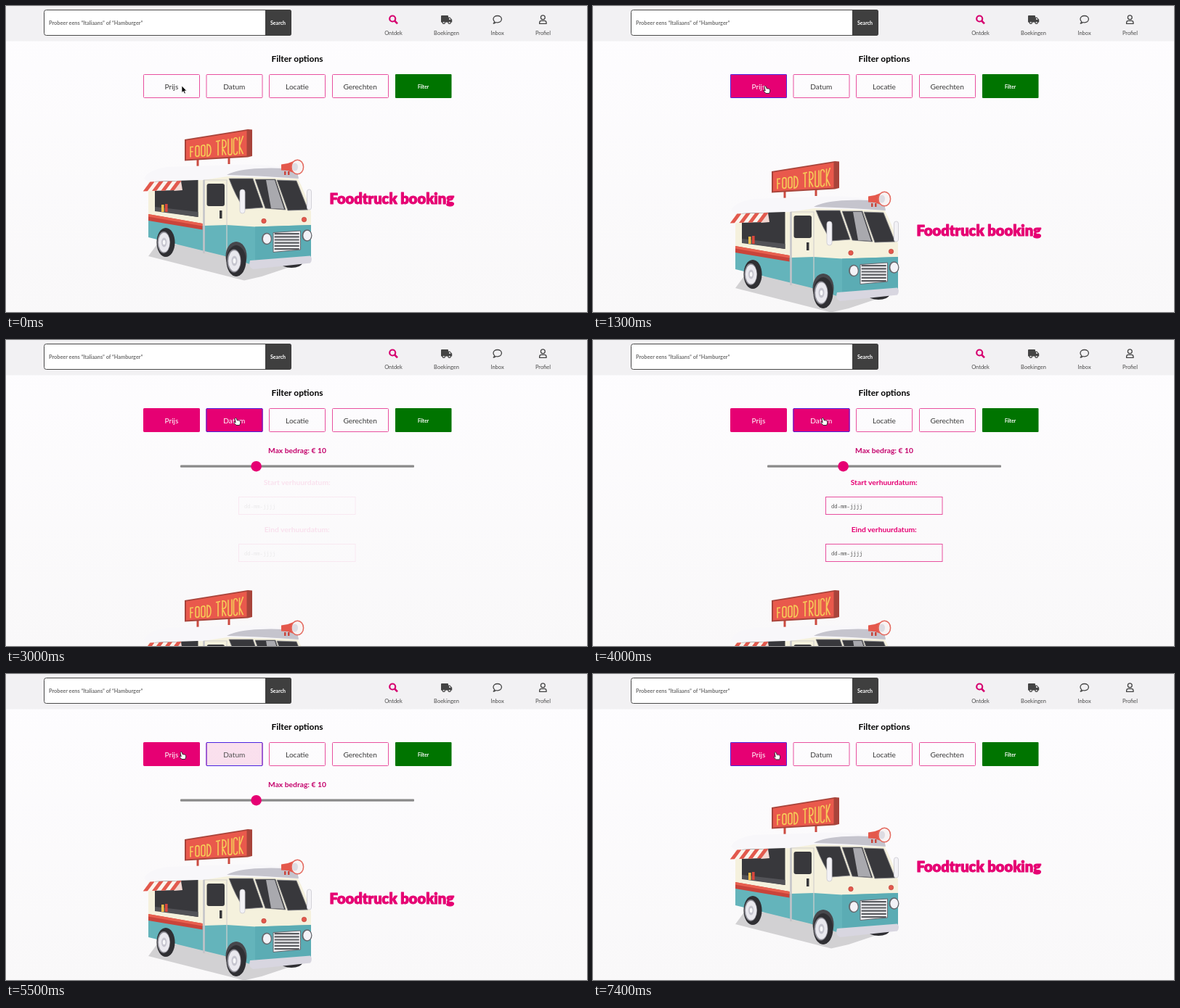
Write an HTML page that moves like this. It is 800x422 px and loops after 7500 ms.

```html
<!DOCTYPE html>
<html lang="nl">
<head>
<meta charset="utf-8">
<title>Filter options</title>
<style>
  html, body { margin: 0; width: 100%; height: 100%; overflow: hidden; background: #fbfafc; }
  svg { display: block; }
  text { font: 10.1px Lato, "Open Sans", sans-serif; fill: #3a3a3a; text-anchor: middle; }
  .bold { font-weight: 700; }
  .nav text { font-size: 7.5px; fill: #4a4a4a; }
  .start { text-anchor: start; }
  .label { font-size: 10.3px; font-weight: 700; fill: #c4006b; }
  .date { font: 7.2px "Noto Sans Mono", monospace; fill: #555; text-anchor: start; }
  .box { fill: none; stroke: #e8509f; }
  .on { fill: #e60073; stroke: #e60073; }
  .focus { fill: none; stroke: #4a22e0; }
  .white { fill: #fff; }
  .glass { fill: #38383c; }
  .brand { font-size: 20.1px; font-weight: 900; fill: #e60073; stroke: #e60073; stroke-width: 1px; stroke-linejoin: round; }

  /* One loop is 7.5 s: price opens at 1.3 s, dates at 2.9 s, they close at 4.9 s and 5.7 s. */
  .anim { animation: 7.5s linear infinite; }
  .step { animation-timing-function: step-end; }
  #hero { animation-name: hero; }
  #price { animation-name: price; }
  #dates { animation-name: dates; }
  #prijsOn { animation-name: prijsOn; }
  #datumOn { animation-name: datumOn; }
  #prijsFocus { animation-name: prijsFocus; }
  #datumFocus { animation-name: datumFocus; }
  #cursor { animation-name: cursor; }
  #arrow { animation-name: arrow; }
  #hand { animation-name: hand; }

  @keyframes hero {
    0% { transform: none; }
    17.33% { transform: translateY(44px); }
    38.66% { transform: translateY(175px); }
    65.33% { transform: translateY(44px); }
    75.99%, 100% { transform: none; }
  }
  @keyframes price {
    0%, 17.33% { opacity: 0; }
    30.66%, 75.98% { opacity: 1; }
    75.99%, 100% { opacity: 0; }
  }
  @keyframes dates {
    0%, 38.66% { opacity: 0; }
    52%, 65.32% { opacity: 1; }
    65.33%, 100% { opacity: 0; }
  }
  @keyframes prijsOn {
    0%, 5.33% { opacity: 0; }
    12%, 100% { opacity: 1; }
  }
  @keyframes datumOn {
    0%, 24.67% { opacity: 0; }
    31.33%, 68% { opacity: 1; }
    74%, 100% { opacity: 0; }
  }
  @keyframes prijsFocus {
    0% { opacity: 0; }
    17.33% { opacity: 1; }
    38.66% { opacity: 0; }
    75.99%, 100% { opacity: 1; }
  }
  @keyframes datumFocus {
    0% { opacity: 0; }
    38.66% { opacity: 1; }
    75.99%, 100% { opacity: 0; }
  }
  @keyframes cursor {
    0% { transform: translate(242px, 110px); }
    5.33%, 18% { transform: translate(239px, 110px); animation-timing-function: ease-in-out; }
    28% { transform: translate(314px, 107.5px); }
    33%, 66% { transform: translate(318px, 107px); animation-timing-function: ease-in-out; }
    73.33%, 85% { transform: translate(243px, 107px); }
    94%, 100% { transform: translate(253px, 107.5px); }
  }
  @keyframes arrow {
    0% { opacity: 1; }
    5.33%, 100% { opacity: 0; }
  }
  @keyframes hand {
    0% { opacity: 0; }
    5.33%, 100% { opacity: 1; }
  }
</style>
</head>
<body>
<svg width="800" height="422" viewBox="0 0 800 422">
  <defs>
    <linearGradient id="page" x2="0" y2="1">
      <stop stop-color="#fefdff"/><stop offset="1" stop-color="#f9f8f9"/>
    </linearGradient>
    <rect id="button" y="94.5" width="77" height="32" rx="1"/>
    <g id="wheel">
      <ellipse rx="13.5" ry="21.5" fill="#2f2f33"/>
      <ellipse cx="-3" rx="9.5" ry="16" fill="#8d8c95"/>
      <ellipse cx="-2.5" rx="8.3" ry="14.3" fill="#e9e8ee"/>
      <ellipse cx="-2.5" rx="4" ry="7" fill="#c6c5cf"/>
      <ellipse cx="-2.5" rx="2" ry="3.5" fill="#f8f8fa"/>
    </g>
    <g id="lamp">
      <ellipse rx="7" ry="8.2" fill="#66676d"/>
      <ellipse cx=".3" rx="5.4" ry="6.8" fill="#f3f2f7"/>
    </g>
  </defs>

  <rect width="800" height="422" fill="url(#page)"/>

  <!-- header -->
  <rect width="800" height="48.5" fill="#f2f1f3"/>
  <rect x="52.5" y="5.500" width="340" height="35" rx="3" fill="#fff" stroke="#4a4a4a"/>
  <path d="M357 5H390a3 3 0 0 1 3 3V38a3 3 0 0 1-3 3H357Z" fill="#3f3f3f"/>
  <text class="bold start" x="59" y="25.700" style="font-size:7.3px;fill:#707070">Probeer eens “Italiaans” of “Hamburger”</text>
  <text class="bold white" x="374.5" y="26" style="font-size:7.1px">Search</text>
  <g class="nav">
    <g fill="none" stroke="#d6006f" stroke-width="2.2">
      <circle cx="532.2" cy="17.5" r="4"/><path d="M535.2 20.5L539 24.3" stroke-width="2.6"/>
    </g>
    <g fill="#444">
      <path d="M600 13h8q1 0 1 1v1.5h2.2l3 3.2V22.6H599V14q0-1 1-1Z"/>
      <circle cx="602.8" cy="22.8" r="2.3"/><circle cx="610.6" cy="22.8" r="2.3"/>
      <path d="M610 16.8h1l1.7 2H610Z" fill="#f2f1f3"/>
      <g fill="#f2f1f3"><circle cx="602.8" cy="22.8" r="1"/><circle cx="610.6" cy="22.8" r="1"/></g>
    </g>
    <g fill="none" stroke="#444" stroke-width="1.3" stroke-linejoin="round">
      <path d="M671.2 24Q672.6 22.8 672.7 21.6Q671 20.2 671 18.1C671 15.4 673.5 13.5 676.7 13.5S682.4 15.4 682.4 18.1S679.9 22.8 676.7 22.8Q675.5 22.8 674.5 22.5Q673 23.9 671.2 24Z"/>
      <circle cx="739.3" cy="15.8" r="2.9"/>
      <path d="M734.6 24.4V23Q734.6 20.3 737.2 20.3H741.4Q744 20.3 744 23V24.4Z"/>
    </g>
    <text x="533.5" y="39.7">Ontdek</text>
    <text x="606.5" y="39.7">Boekingen</text>
    <text x="676.5" y="39.7">Inbox</text>
    <text x="739.5" y="39.7">Profiel</text>
  </g>

  <!-- filter buttons -->
  <text class="bold" x="401" y="77" style="font-size:12px;fill:#000">Filter options</text>
  <g class="box">
    <use href="#button" x="189.5"/>
    <use href="#button" x="276"/>
    <use href="#button" x="362.5"/>
    <use href="#button" x="449.5"/>
  </g>
  <rect x="536" y="94" width="77.5" height="33" rx="1" fill="#007400"/>
  <text class="bold white" x="574.5" y="113.5" style="font-size:6.5px">Filter</text>
  <text x="228" y="114.5">Prijs</text>
  <text x="314.3" y="114.5">Datum</text>
  <text x="401" y="114.5">Locatie</text>
  <text x="487.6" y="114.5">Gerechten</text>
  <g id="prijsOn" class="anim">
    <use class="on" href="#button" x="189.5"/>
    <text class="white" x="228" y="114.5">Prijs</text>
  </g>
  <g id="datumOn" class="anim">
    <use class="on" href="#button" x="276"/>
    <text class="white" x="314.3" y="114.5">Datum</text>
  </g>
  <g id="prijsFocus" class="anim step"><use class="focus" href="#button" x="189.5"/></g>
  <g id="datumFocus" class="anim step"><use class="focus" href="#button" x="276"/></g>

  <!-- filter panels -->
  <g id="price" class="anim">
    <text class="label" x="401" y="156">Max bedrag: € 10</text>
    <rect x="240" y="172.5" width="322" height="3.2" rx="1" fill="#8a8a8a"/>
    <circle cx="344.6" cy="174.2" r="7.3" fill="#e60073"/>
  </g>
  <g id="dates" class="anim">
    <text class="label" x="400.7" y="199.8" style="fill:#e60073">Start verhuurdatum:</text>
    <rect class="box" x="320.5" y="216.500" width="160.5" height="24"/>
    <text class="date" x="328" y="231.5">dd-mm-jjjj</text>
    <text class="label" x="400.7" y="265" style="fill:#e60073">Eind verhuurdatum:</text>
    <rect class="box" x="320.5" y="281.5" width="160.5" height="24"/>
    <text class="date" x="328" y="296.8">dd-mm-jjjj</text>
  </g>

  <!-- food truck -->
  <g id="hero" class="anim step">
    <path d="M207 330L196 345L328 378.5L352 373L400 357L300 326Z" fill="#d2d1d3"/>
    <ellipse cx="393" cy="354" rx="15" ry="7" fill="#2f2f33"/>

    <!-- sign -->
    <path d="M262.5 209h3v12h-3ZM305.500 206h3v12h-3Z" fill="#cb4a40"/>
    <path d="M246 184L333 170L339 170.5V207L333 208.5L246 213.5Z" fill="#a8443b"/>
    <path d="M248 185.5L331.5 172V206.5L248 211.5Z" fill="#e9594c"/>
    <path transform="translate(254 208.5) skewY(-3.5)" fill="none" stroke="#f6ca58" stroke-width="1.6"
      d="M0 0V-14H4M0-7.5H3.5
         M7-3V-12.5a2.5 2.5 0 0 1 5 0V-3a2.5 2.5 0 0 1-5 0Z
         M15-3V-13a2.5 2.5 0 0 1 5 0V-3a2.5 2.5 0 0 1-5 0Z
         M23 0V-16q5 0 5 8T23 0Z
         M35-19.500L41-20.500M38-20V0
         M44 0V-21q5 0 5 5.500t-5 5.500l5 10
         M52-22V-3q0 3 2.500 3t2.500-3V-22.500
         M64.500-19q0-4-2.500-4t-2.500 4V-4q0 4 2.500 4t2.500-4
         M67.500-24V0M72.500-25L67.500-11L72.500 0"/>

    <!-- body -->
    <path d="M196 236L304 232L400 235Q412 256 420 284V304L304 307L196 294Z" fill="#f5f1dd"/>
    <path d="M196 291L272 303L304 302L343 304.5L420 302V346L336 356L298 344L196 319Z" fill="#64b4bb"/>
    <path d="M343 304.5L420 302V346L343 355Z" fill="#5bacb4"/>
    <path d="M190 238Q195 226 222 222L330 218.5Q380 219 398 227L402 238L305 235L272 240L196 243Z" fill="#f8f7fa"/>
    <path d="M304 233Q318 225 350 224Q376 222.5 396 226Q402 229 403 238Q350 234 304 233Z" fill="#c5c4cd"/>

    <!-- serving hatch -->
    <path class="glass" d="M205 242L264.5 240V291L205 282Z"/>
    <path d="M205 277L264.5 284V291L205 283Z" fill="#525257"/>
    <path d="M214 274h3.6v10h-3.6Z" fill="#f0bd4a"/>
    <path d="M219 273h3.6v11h-3.6Z" fill="#d9473d"/>
    <path d="M241 241.500L243 254L231 255Z" fill="#f3d9d3"/>
    <g transform="translate(199 242) skewX(-38)" stroke-width="13">
      <path d="M0 7L42 5.500" stroke="#fbf5ee"/>
      <path d="M0 7L42 5.500" stroke="#e2594d" stroke-dasharray="6 6"/>
    </g>
    <path d="M196 287L270.5 300V308.5L196 296Z" fill="#c9443b"/>
    <path d="M196 287L270.5 300V303.500L196 290.500Z" fill="#e8604f"/>

    <!-- door -->
    <path d="M272.5 240V341L304 346V240Z" fill="none" stroke="#d3d1ce" stroke-width="1.2"/>
    <path d="M272.5 240V341" stroke="#c3c3c8" stroke-width="2.500"/>
    <rect class="glass" x="276.5" y="245" width="24.5" height="31" rx="3"/>
    <rect x="294" y="282" width="3.5" height="11" fill="#38383c"/>

    <!-- cab -->
    <g class="glass" stroke="#85858b" stroke-width=".8" stroke-linejoin="round">
      <path d="M307 238H340L354 278L328 280Q316 262 307 238Z"/>
      <path d="M343 239H371L385 281L357 279Z"/>
      <path d="M373 240L400 241L416 281L388 282Z"/>
    </g>
    <path d="M358 240h12l13 40-18-1Z" fill="#a9a9ae"/>
    <g fill="#f3f2f6" stroke="#c9c8d0" stroke-width=".8">
      <rect x="322" y="253" width="7" height="33" rx="3.500"/>
      <rect x="414.5" y="253" width="6" height="28" rx="3"/>
    </g>
    <path d="M368 312.5L405.5 310V336L368 339.5Z" fill="#f2f2f5" stroke="#66676d"/>
    <path d="M386.7 313V337" stroke="#5b5c61" stroke-width="34" stroke-dasharray="2.2 2"/>
    <use href="#lamp" x="359" y="321"/>
    <use href="#lamp" x="414.5" y="316.500"/>
    <g fill="#e4584c" stroke="#b8463d" stroke-width=".7">
      <circle cx="355" cy="296.5" r="3.2"/><circle cx="410.5" cy="294.5" r="3.2"/>
    </g>
    <path d="M336 351L419 344.5Q423 349 419 354.5L340 363Q333 360 336 351Z" fill="#d8d6e0"/>

    <!-- wheels -->
    <use href="#wheel" transform="translate(220 326) scale(.93)"/>
    <ellipse cx="317" cy="345" rx="14.500" ry="20" fill="#47474c"/>
    <use href="#wheel" x="317" y="351.500"/>

    <!-- megaphone -->
    <path d="M383 228h2.5v5h-2.5ZM388 228h2.5v5h-2.5Z" fill="#c9463d"/>
    <path d="M379 218.5L388 217L396 214V230L388 227L379 226.5Z" fill="#e4584c"/>
    <ellipse cx="401.3" cy="222" rx="8.3" ry="9.8" fill="#f8f3f3" stroke="#e46a5f" stroke-width="1.500"/>
    <ellipse cx="398" cy="222" rx="4" ry="5.5" fill="#dedce2"/>

    <text class="brand" x="531.2" y="273">Foodtruck booking</text>
  </g>

  <!-- pointer -->
  <g id="cursor" class="anim">
    <path id="arrow" class="anim step" d="M0 0V9.5L2.2 7.6L3.7 11L5.3 10.3L3.8 7H6.7Z" fill="#000" stroke="#fff" stroke-width=".7"/>
    <path id="hand" class="anim step" d="M-2.5 .8Q-1.6 0-.8 .9L.3 4Q1.2 3.2 1.9 4.2Q2.8 3.5 3.4 4.5Q4.6 4.300 4.700 5.800V8L3.600 10.500H-1L-4 7.200Q-4.300 6-3 6.100L-1.800 7L-2.900 1.800Q-3 1.200-2.500 .8Z" fill="#fff" stroke="#222" stroke-width=".9" stroke-linejoin="round"/>
  </g>
</svg>
</body>
</html>
```
